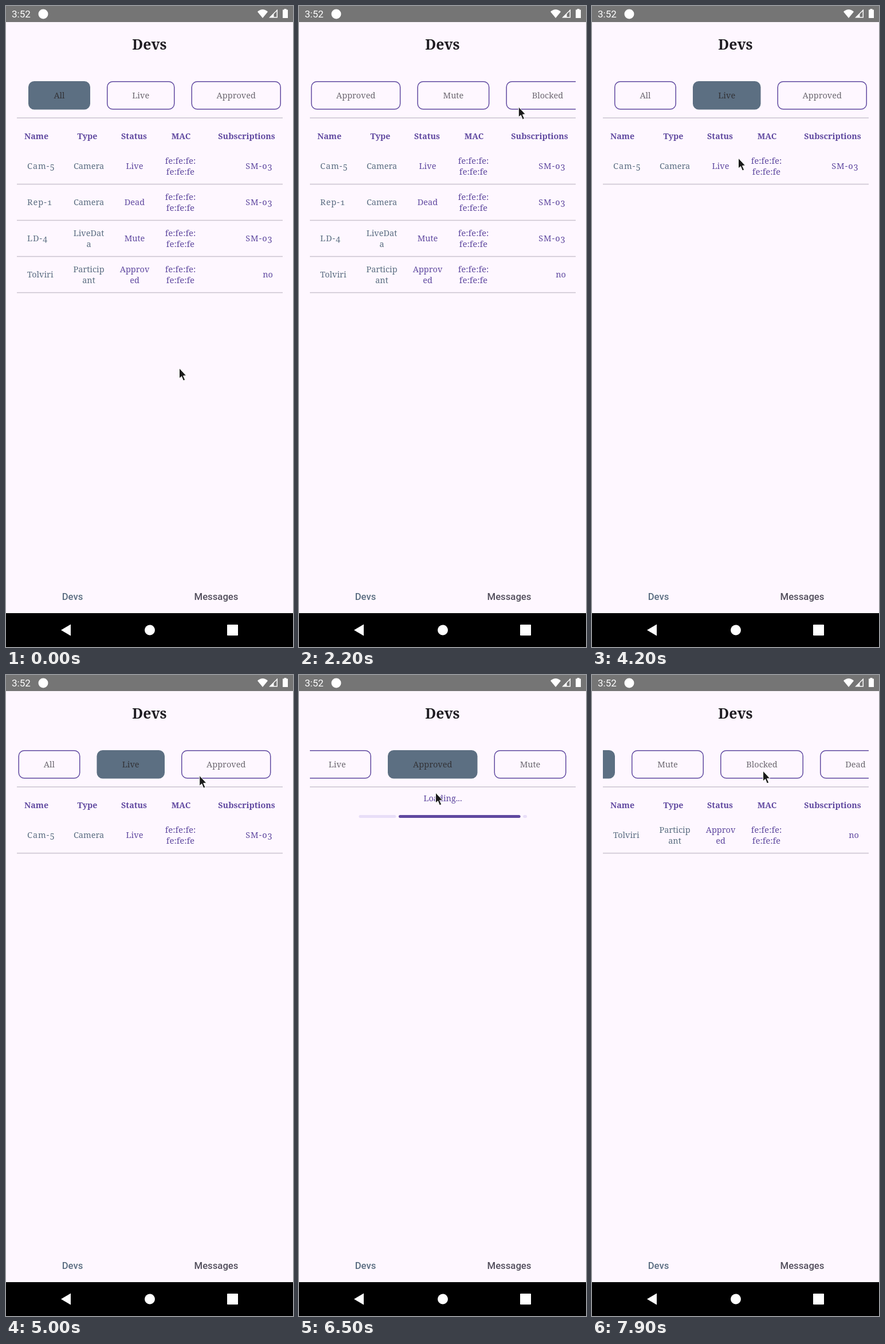
Recreate the animation shown at these times as an HTML page. Size 501x1117 px, loop 8 s.

```html
<!DOCTYPE html>
<html lang="en">
<head>
<meta charset="utf-8">
<title>Devs</title>
<style>
  html, body { margin: 0; width: 100%; height: 100%; overflow: hidden; background: #fef7ff; }
  svg { display: block; width: 501px; height: 1117px; }
  text { font: 400 14.5px "Noto Serif", serif; font-variant-numeric: oldstyle-nums; }
  .title { font-size: 24.8px; font-weight: 700; fill: #1d1b20; }
  .head { font-size: 14.3px; font-weight: 700; }
  .ui { font: 500 16.7px Roboto, sans-serif; font-variant-numeric: normal; }
  .clock { font-weight: 400; font-size: 17px; }
  .id { letter-spacing: 1px; }
  .mac { font-size: 15px; }
  .mid { text-anchor: middle; }
  .end { text-anchor: end; }
  .slate { fill: #5a6d81; }
  .purple { fill: #6049a0; }
  .rule { stroke: #cac4d0; stroke-width: 1.5; }
</style>
</head>
<body>
<svg viewBox="0 0 501 1117">
  <defs><clipPath id="strip"><rect x="19" y="120" width="464" height="70"/></clipPath></defs>
  <rect width="501" height="1117" fill="#fef7ff"/>

  <rect width="501" height="28" fill="#757575"/>
  <g fill="#fff">
    <text class="ui clock" x="10" y="20">3:52</text>
    <circle cx="65" cy="14" r="8.5"/>
    <path d="M448 21L439 10Q448 2 457 10Z"/>
    <path d="M459 20.5L474 5.5V20.5Z"/>
    <path d="M467.5 14L472.5 9V19H467.5Z" fill="#757575"/>
    <path d="M485.5 5h4v1.5h2.5v14.5h-9v-14.5h2.5z"/>
  </g>

  <text class="title mid" x="250.5" y="75.5">Devs</text>
  <g clip-path="url(#strip)"><g id="chips"></g></g>
  <path class="rule" d="M19 195H483"/>

  <g id="table"></g>
  <g id="loader">
    <text class="purple mid" x="251" y="220">Loading...</text>
  </g>

  <text class="ui mid slate" x="116" y="1035">Devs</text>
  <text class="ui mid" x="367" y="1035" fill="#524e5c">Messages</text>
  <rect y="1058" width="501" height="59"/>
  <g fill="#fff">
    <path d="M96 1087.5L113 1077.5V1097.5Z"/>
    <circle cx="251" cy="1087.5" r="9"/>
    <rect x="386" y="1078" width="19" height="19" rx="1"/>
  </g>

  <path id="cursor" d="M.5 -1V17L4.5 13.5L7.5 21L10.7 19.5L7.5 12.5L12.5 12Z"
        fill="#1b1b1b" stroke="#fff" stroke-linejoin="round"/>
</svg>
<script>
const LOOP = 8000, STEP = 100, LOAD = 970;
const PURPLE = "#6049a0", SLATE = "#5c6f82";
const $ = id => document.getElementById(id);

function add(parent, tag, attrs, text) {
  const el = document.createElementNS("http://www.w3.org/2000/svg", tag);
  for (const k in attrs) el.setAttribute(k, attrs[k]);
  if (text) el.textContent = text;
  return parent.appendChild(el);
}
const show = (el, on) => el.setAttribute("display", on ? "inline" : "none");
const clamp = x => Math.min(1, Math.max(0, x));
const smooth = x => (x = clamp(x), x * x * (3 - 2 * x));

// Filter chips flow left to right with a fixed gap
let left = 39;
const chips = Object.entries({ All: 108, Live: 118.5, Approved: 156.5, Mute: 126, Blocked: 145, Dead: 124 })
  .map(([label, w]) => {
    const box = add($("chips"), "rect",
      { x: left + .75, y: 131.75, width: w - 1.5, height: 48, rx: 9.5, "stroke-width": 1.5 });
    const text = add($("chips"), "text", { x: left + w / 2, y: 161, class: "mid" }, label);
    left += w + 29;
    return { label, box, text };
  });

const table = $("table");
const columns = [
  { head: "Name", mid: 53, x: 37, cls: "slate" },
  { head: "Type", mid: 142, x: 144.5, cls: "slate mid" },
  { head: "Status", mid: 223.5, x: 224.5, cls: "purple mid" },
  { head: "MAC", mid: 305.5, x: 304.5, cls: "purple mid mac" },
  { head: "Subscriptions", mid: 420, x: 466, cls: "purple end" }
];
for (const { head, mid } of columns)
  add(table, "text", { x: mid, y: 232, class: "head purple mid" }, head);

// A cell may hold two lines, split by "|"
function cell(row, { x, cls }, value) {
  const lines = value.split("|");
  const first = lines.length > 1 ? 275 : 284;
  const spaced = value.includes("-") ? " id" : "";
  lines.forEach((line, i) => add(row, "text", { x, y: first + i * 18.7, class: cls + spaced }, line));
}

const MAC = "fe:fe:fe:|fe:fe:fe";
const rows = [
  ["Cam-5", "Camera", "Live", MAC, "SM-03"],
  ["Rep-1", "Camera", "Dead", MAC, "SM-03"],
  ["LD-4", "LiveDat|a", "Mute", MAC, "SM-03"],
  ["Tolviri", "Particip|ant", "Approv|ed", MAC, "no"]
].map(values => {
  const g = add(table, "g", {});
  values.forEach((value, i) => cell(g, columns[i], value));
  add(g, "path", { class: "rule", d: "M19 310.5H483" });
  return { g, status: values[2].replace("|", "") };
});

const taps = [
  { at: 0, filter: "All" },
  { at: 3130, filter: "Live" },
  { at: 5815, filter: "Approved" }
];

const swipes = [
  { at: 1000, span: 700, by: 499 },
  { at: 1900, span: 700, by: -499 },
  { at: 4900, span: 500, by: 168.5 },
  { at: 7100, span: 700, by: 271.5 }
];
const scroll = t => swipes.reduce((sum, s) => sum + s.by * smooth((t - s.at) / s.span), 0);

// Places where the pointer turns or rests: time, x, y
const stops = [
  [0, 302, 632], [400, 230, 400], [900, 314, 168], [1300, 110, 171], [1800, 85, 190],
  [2400, 487, 172], [3000, 248, 158], [3200, 248, 158], [4200, 255, 266], [4500, 257, 264],
  [4900, 350, 176], [5500, 178, 178], [5800, 238, 160], [6500, 238, 206],
  [7100, 440, 175], [7500, 200, 190], [7900, 298, 168]
];
function pointer(t) {
  const i = Math.max(1, stops.findIndex(s => s[0] >= t));
  const [t0, x0, y0] = stops[i - 1], [t1, x1, y1] = stops[i];
  const k = smooth((t - t0) / (t1 - t0));
  return [x0 + (x1 - x0) * k, y0 + (y1 - y0) * k];
}

// Cubic easing with handles (x1, 0) and (x2, 1)
function ease(x, x1, x2) {
  x = clamp(x);
  let lo = 0, hi = 1;
  for (let i = 0; i < 24; i++) {
    const u = (lo + hi) / 2, v = 1 - u;
    if (3 * v * v * u * x1 + 3 * v * u * u * x2 + u ** 3 < x) lo = u; else hi = u;
  }
  return smooth(x === 1 ? 1 : lo);
}

const segments = ["#e8def8", "#e8def8", "#e8def8", PURPLE, PURPLE]
  .map(fill => add($("loader"), "rect", { y: 244, height: 5, rx: 2.5, fill }));

// Two bars chase each other along the track, with a gap at each end
function drawLoader(ms) {
  const width = 293.5, gap = 4.5 / width;
  const m = ms % 1800;
  const head1 = ease(m / 750, .2, .8), tail1 = ease((m - 333) / 850, .4, 1);
  const head2 = ease((m - 1000) / 567, 0, .65), tail2 = ease((m - 1267) / 533, .1, .45);
  const after = h => h > 0.001 ? h + gap : 0;
  [
    [after(head1), 1],
    [after(head2), tail1 < 1 ? tail1 - gap : 1],
    [0, tail2 - gap],
    [tail1, head1],
    [tail2, head2]
  ].forEach(([a, b], i) => {
    segments[i].setAttribute("x", 104.5 + width * a);
    segments[i].setAttribute("width", Math.max(0, b - a) * width);
  });
}

function draw(t) {
  const { at, filter } = taps.filter(tap => tap.at <= t).pop();
  const loading = at > 0 && t - at < LOAD;

  $("chips").setAttribute("transform", `translate(${-scroll(t)} 0)`);
  for (const { label, box, text } of chips) {
    const on = label === filter;
    box.setAttribute("fill", on ? SLATE : "#fef7ff");
    box.setAttribute("stroke", on ? SLATE : PURPLE);
    text.setAttribute("fill", on ? "#333337" : "#6c6870");
  }

  show(table, !loading);
  show($("loader"), loading);
  if (loading) drawLoader(t - at);

  let line = 0;
  for (const { g, status } of rows) {
    const on = filter === "All" || filter === status;
    show(g, on);
    if (on) g.setAttribute("transform", `translate(0 ${63 * line++})`);
  }

  $("cursor").setAttribute("transform", `translate(${pointer(t)})`);
}

const start = performance.now();
function tick() {
  const t = (performance.now() - start) % LOOP;
  draw(Math.floor(t / STEP) * STEP);
  requestAnimationFrame(tick);
}
tick();
</script>
</body>
</html>
```
